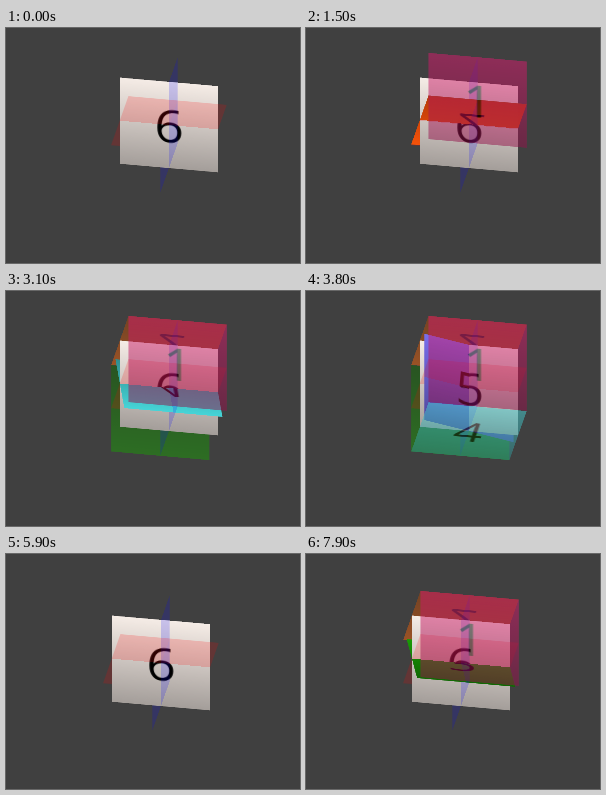
Recreate the animation shown at these times as an HTML page. Size 294 px wide and 235 px high, loop 8000 ms.

```html
<!DOCTYPE html>
<html lang="en">
<head>
<meta charset="utf-8">
<title>Building a cube</title>
<style>
  html, body { margin: 0; width: 100%; height: 100%; overflow: hidden; background: #404040; }
  #cube {
    position: absolute; width: 0; height: 0;
    transform-style: preserve-3d;
    transform: rotateX(30deg) rotateY(10deg);
  }
  #cube div {
    position: absolute; left: -50px; top: -50px; width: 100px; height: 100px;
    font: 52px/100px "Open Sans", "Noto Sans", sans-serif;
    text-align: center; color: #000;
  }
  #cube .floor { background: rgba(255, 0, 0, .18); transform: rotateX(90deg); }
  #cube .wall { background: rgba(0, 0, 255, .18); transform: rotateY(90deg); }
  #cube .face { background-image: linear-gradient(#0000, #0005); }
</style>
</head>
<body>
<div id="cube"><div class="floor"></div><div class="wall"></div></div>
<script>
const LOOP = 8000, RESET = 5900, STEP = 100;
const TURN = 540, PUSH = 365, HALF = 50;

// Each face turns about the centre, then is pushed outwards while it fades.
const faces = [
  { color: 'rgb(220,25,110)', axis: 'X', angle: 0, start: -40 - TURN },
  { color: 'rgb(245,100,10)', axis: 'X', angle: 90, start: 325 },
  { color: 'rgb(25,155,5)', axis: 'X', angle: 180, start: 1230 },
  { color: 'rgb(70,212,215)', axis: 'X', angle: 270, start: 2135 },
  { color: 'rgb(120,110,235)', axis: 'Y', angle: 90, start: 3040 },
  { color: 'rgb(245,236,230)', axis: 'Y', angle: -90, start: 4100, always: true },
];

const cube = document.getElementById('cube');
faces.forEach((face, i) => {
  face.el = document.createElement('div');
  face.el.className = 'face';
  face.el.textContent = i + 1;
  face.el.style.backgroundColor = face.color;
  cube.append(face.el);
});

// cubic-bezier(.42, 0, .58, 1), solved by bisection
function easeInOut(x) {
  if (x <= 0) return 0;
  if (x >= 1) return 1;
  let lo = 0, hi = 1, s;
  for (let i = 0; i < 24; i++) {
    s = (lo + hi) / 2;
    const bx = 1.26 * s * (1 - s) ** 2 + 1.74 * s * s * (1 - s) + s ** 3;
    if (bx < x) lo = s; else hi = s;
  }
  return s * s * (3 - 2 * s);
}

function draw(now) {
  const t = Math.floor((now % LOOP) / STEP) * STEP;
  const second = t >= RESET;
  const u = t - 600 - (second ? RESET : 0);
  cube.style.left = second ? '155.1px' : '163.3px';
  cube.style.top = second ? '108.8px' : '96.8px';

  for (const { el, axis, angle, start, always } of faces) {
    const turn = easeInOut((u - start) / TURN);
    const push = easeInOut((u - start - TURN) / PUSH);
    const shown = always || (angle ? turn : push) > 0;
    el.style.display = shown ? 'block' : 'none';
    el.style.transform = `rotate${axis}(${angle * turn}deg) translateZ(${HALF * push}px)`;
    el.style.opacity = 1 - push / 2;
  }
}

function frame() {
  draw(performance.now());
  requestAnimationFrame(frame);
}
frame();
</script>
</body>
</html>
```
